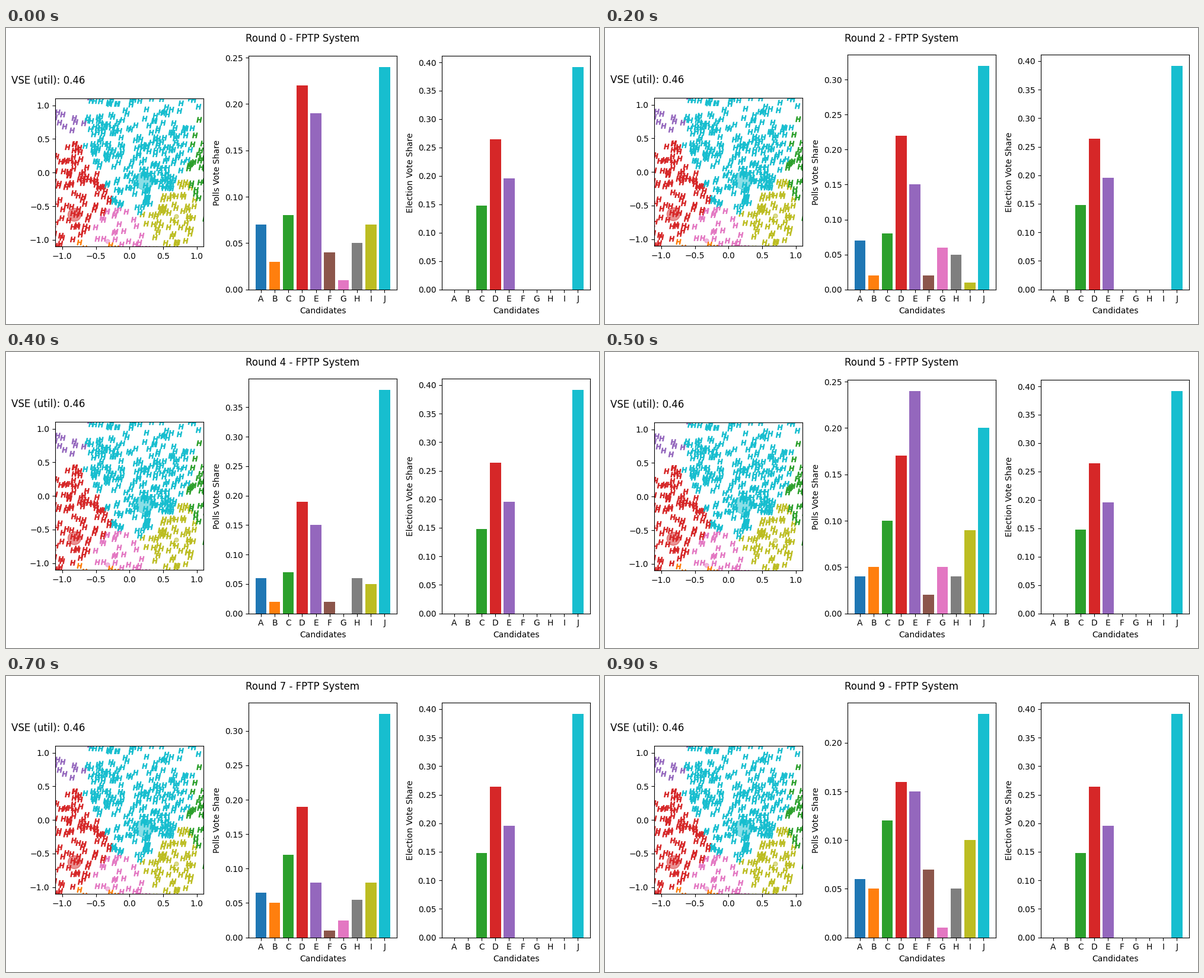
Recreate the animation shown at these times as a matplotlib script. Size 1000x500 px, loop 1000 ms.

```python
import numpy as np
import matplotlib.pyplot as plt
from matplotlib.animation import FuncAnimation

W, H, DPI = 1000, 500, 100
ROUNDS = 10
BASE, SIDE = 441.65, 249.9
LEFTS = 83.35 + 325.87 * np.arange(3)
NAMES = list("ABCDEFGHIJ")
COLORS = [f"C{i}" for i in range(ROUNDS)]

# Key poll rounds in percent; rounds between them are interpolated
POLLS = {
    0: (7, 3, 8, 22, 19, 4, 1, 5, 7, 24),
    2: (7, 2, 8, 22, 15, 2, 6, 5, 1, 32),
    4: (6, 2, 7, 19, 15, 2, 0, 6, 5, 38),
    5: (4, 5, 10, 17, 24, 2, 5, 4, 9, 20),
    6: (7, 7, 10, 18, 10, 1, 3, 5, 8, 31),
    8: (6, 3, 14, 20, 6, 1, 2, 6, 8, 34),
    9: (6, 5, 12, 16, 15, 7, 1, 5, 10, 23),
}
RESULT = dict(C=.148, D=.264, E=.196, J=.392)

# Candidate: x, y, handicap, dot diameter in pixels
SITES = {
    "B": (-0.35, -1.07, 0, 0),
    "C": (1.38, -0.34, 0, 0),
    "D": (-0.82, -0.62, 0, 22),
    "E": (-0.91, 0.10, 1.02, 0),
    "F": (1.35, -1.09, 0, 0),
    "G": (-0.33, -1.02, 0, 7),
    "I": (0.69, -0.65, 0, 7),
    "J": (0.22, -0.12, 0, 30),
}


def color(name):
    return COLORS[NAMES.index(name)]


def choice(x, y):
    def cost(name):
        sx, sy, handicap, _ = SITES[name]
        return (x - sx) ** 2 + (y - sy) ** 2 + handicap
    return min(SITES, key=cost)


def poll(i):
    table = np.array(list(POLLS.values())) / 100
    return np.array([np.interp(i, list(POLLS), col) for col in table.T])


def box(left, top, bottom):
    return [left / W, 1 - bottom / H, SIDE / W, (bottom - top) / H]


def make_bars(ax, values, label):
    bars = ax.bar(NAMES, values, color=COLORS)
    ax.set_xlabel("Candidates")
    ax.set_ylabel(label)
    return bars


fig = plt.figure(figsize=(W / DPI, H / DPI), dpi=DPI)
space, polls, votes = (fig.add_axes(box(x, 44.7, BASE)) for x in LEFTS)
title = fig.suptitle("", y=0.982)

for name, (x, y, _, size) in SITES.items():
    if size:
        space.scatter(x, y, s=(size * 72 / DPI) ** 2, color=color(name),
                      alpha=0.5, lw=1)
voters = np.random.default_rng(11).normal(0, 1.1, (1000, 2))
space.scatter(*voters.T, marker="$H$", s=36,
              c=[color(choice(*v)) for v in voters])
ticks = np.arange(-1, 1.1, 0.5)
space.set(xlim=(-1.1, 1.1), ylim=(-1.1, 1.1), xticks=ticks, yticks=ticks)
space.text(-0.05, 1.1, "VSE (util): 0.46", size=12, ha="center",
           transform=space.transAxes)

poll_bars = make_bars(polls, poll(0), "Polls Vote Share")
make_bars(votes, [RESULT.get(n, 0) for n in NAMES], "Election Vote Share")


def draw(i):
    title.set_text(f"Round {i} - FPTP System")
    shares = poll(i)
    for bar, share in zip(poll_bars, shares):
        bar.set_height(share)
    limit = shares.max() * 1.05
    polls.set_ylim(0, limit)
    # A tick label right at the top edge pushes the panels down
    top = 46.9 if limit % 0.05 < 0.004 else 44.7
    for ax, left in zip((polls, votes), LEFTS[1:]):
        ax.set_position(box(left, top, BASE))
    mid = (top + BASE) / 2
    space.set_position(box(LEFTS[0], mid - SIDE / 2, mid + SIDE / 2))
    return []


anim = FuncAnimation(fig, draw, frames=ROUNDS, interval=100, repeat=True,
                     repeat_delay=0, init_func=lambda: draw(0))
plt.show()
```
